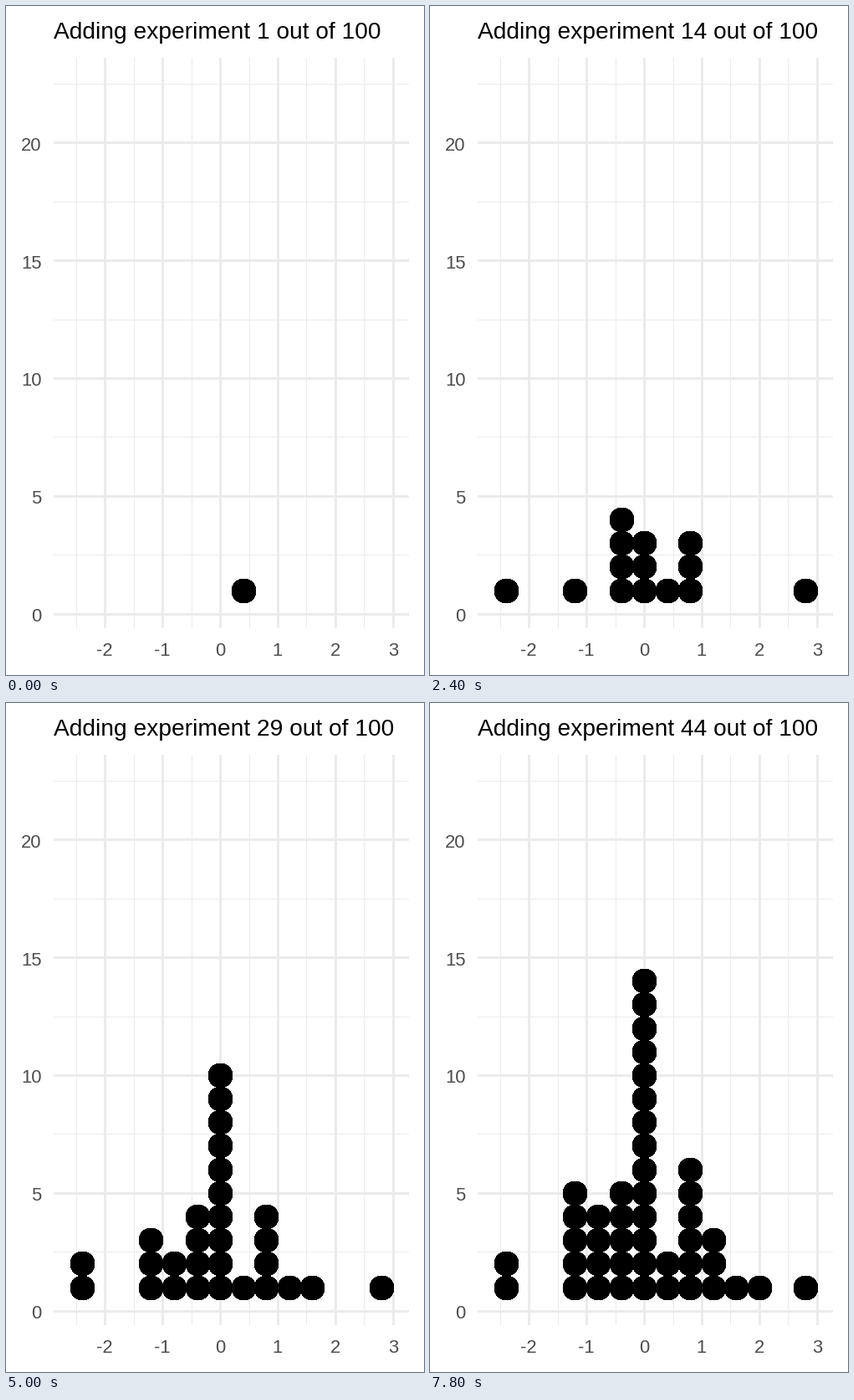
These frames come from a looping animation (500 by 800 pixels, 8000 ms). A matplotlib script:

```python
import matplotlib.pyplot as plt
from matplotlib.animation import FuncAnimation
from matplotlib.patches import Circle

W, H, DPI = 500, 800, 100
FRAMES, INTERVAL = 40, 200
TOTAL = 100
RATE = 99 / 89          # experiments added per frame

LEFT, RIGHT, TOP, BOTTOM = 57, 482, 62, 744
X0, X_UNIT = 256.6, 68.9
Y0, Y_UNIT = 727.25, 28.18
RADIUS = 14.5
GRID, LABEL = "#EBEBEB", "#4D4D4D"

# Column of each experiment, in bins of 0.4
BINS = [1, 0, -1, 2, 0, 7, -1, 0, -3,
        -1, 2, -6, -1, 2,
        0, -3, 4, 0, -2, 2, 0, -6, 3,
        0, 0, -2, 0, 0, -3,
        -2, 5, 0, 2, -2,
        0, -3, 0, 1, 2, -1, 0, 3, -3, 3]


def px(x):
    return X0 + x * X_UNIT


def py(y):
    return Y0 - y * Y_UNIT


def pt(pixels):
    return pixels * 72 / DPI


def mid(v):
    """Centre of the pixel that holds v."""
    return int(v) + 0.5


def grid_line(xs, ys, width, z):
    ax.plot(xs, ys, color=GRID, lw=pt(width), antialiased=False, snap=False,
            solid_capstyle="butt", zorder=z)


def v_line(x, width, z):
    grid_line([mid(px(x))] * 2, [TOP, BOTTOM], width, z)


def h_line(y, width, z):
    grid_line([LEFT, RIGHT], [mid(py(y))] * 2, width, z)


def label(x, y, text, size, color, ha):
    return ax.text(x, y, text, fontsize=pt(size), color=color, ha=ha,
                   va="baseline", family=["Liberation Sans", "DejaVu Sans"])


fig = plt.figure(figsize=(W / DPI, H / DPI), dpi=DPI, facecolor="white")
ax = fig.add_axes([0, 0, 1, 1])
ax.set_xlim(0, W)
ax.set_ylim(H, 0)
ax.axis("off")

for i in range(6):
    v_line(i - 2.5, 1, 1)
    v_line(i - 2, 3, 2)
    label(px(i - 2) - 0.5, 777, str(i - 2), 22, LABEL, "center")
for i in range(5):
    h_line(5 * i + 2.5, 1, 1)
    h_line(5 * i, 3, 2)
    label(42.4, py(5 * i) + 9, str(5 * i), 22, LABEL, "right")

title = label(57, 39, "", 28.15, "black", "left")

dots = []
heights = {}
for b in BINS:
    heights[b] = heights.get(b, 0) + 1
    center = mid(px(0.4 * b)), mid(py(heights[b]))
    dot = Circle(center, RADIUS, fc="black", lw=0, antialiased=False,
                 snap=False, zorder=3)
    dots.append(ax.add_patch(dot))


def draw(frame):
    count = round(1 + frame * RATE)
    title.set_text(f"Adding experiment {count} out of {TOTAL}")
    for i, dot in enumerate(dots):
        dot.set_visible(i < count)
    return [title, *dots]


anim = FuncAnimation(fig, draw, frames=FRAMES, interval=INTERVAL,
                     repeat=True, repeat_delay=0, blit=False)
plt.show()
```
